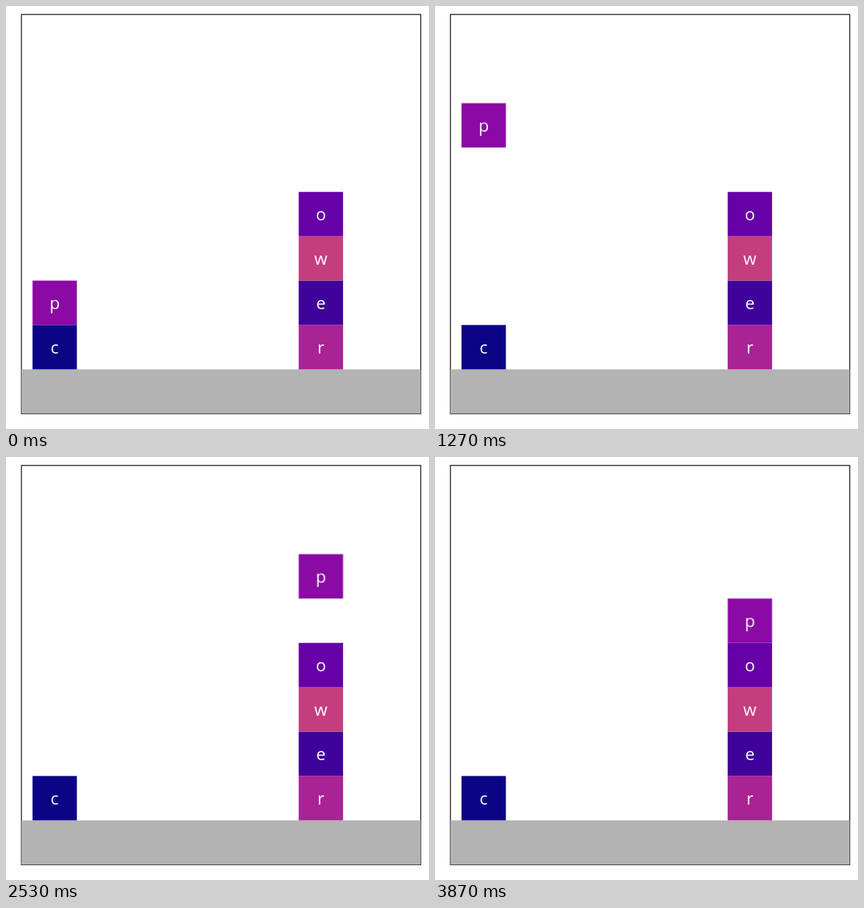
An HTML page that plays this animation: 600x600 px, repeating every 4.87 s.

```html
<!DOCTYPE html>
<html lang="en">
<head>
<meta charset="utf-8">
<title>Stacking blocks</title>
<style>
  html, body { margin: 0; width: 100%; height: 100%; overflow: hidden; background: #fff; }
  svg { display: block; width: 100vw; height: 100vh; }
  text { font: 24px "Open Sans", "Noto Sans", sans-serif; fill: #fff; text-anchor: middle; }

  /* One cell is 62.93px. Lift four cells, cross six, lower one. */
  #mover { animation: carry 4870ms infinite; }
  @keyframes carry {
    0%        { transform: translate(0, 0); animation-timing-function: step-end; }
    1.28679%  { transform: translate(0, -12.586px); animation-timing-function: steps(19, start); }
    27.29637% { transform: translate(0, -251.72px); animation-timing-function: step-end; }
    40.98563% { transform: translate(37.758px, -251.72px); animation-timing-function: steps(9, start); }
    53.30595% { transform: translate(377.58px, -251.72px); animation-timing-function: steps(20, start); }
    80.68446%, 100% { transform: translate(377.58px, -188.79px); }
  }
</style>
</head>
<body>
<svg viewBox="0 0 600 600">
  <rect x="21.9" y="12" width="566.4" height="566.4" fill="#fff" stroke="#000" stroke-width="1.2"/>
  <rect x="21.9" y="515.4" width="566.4" height="62.93" fill="#b3b3b3"/>
  <g id="blocks"></g>
</svg>
<script>
  const CELL = 62.93, FLOOR = 515.4, LEFT = 37.6, RIGHT = LEFT + 6 * CELL;
  const parent = document.getElementById("blocks");

  function add(tag, attrs, to) {
    const el = document.createElementNS("http://www.w3.org/2000/svg", tag);
    for (const key in attrs) el.setAttribute(key, attrs[key]);
    return to.appendChild(el);
  }

  function block(letter, fill, x, level, id) {
    const y = FLOOR - (level + 1) * CELL;
    const g = add("g", id ? { id } : {}, parent);
    add("rect", { x, y, width: CELL, height: CELL, fill }, g);
    add("text", { x: x + CELL / 2, y: y + 40.2 }, g).textContent = letter;
  }

  block("c", "#0b0586", LEFT, 0);
  block("r", "#a92395", RIGHT, 0);
  block("e", "#3f039c", RIGHT, 1);
  block("w", "#c43e7f", RIGHT, 2);
  block("o", "#6600a7", RIGHT, 3);
  block("p", "#8b09a5", LEFT, 1, "mover");
</script>
</body>
</html>
```
